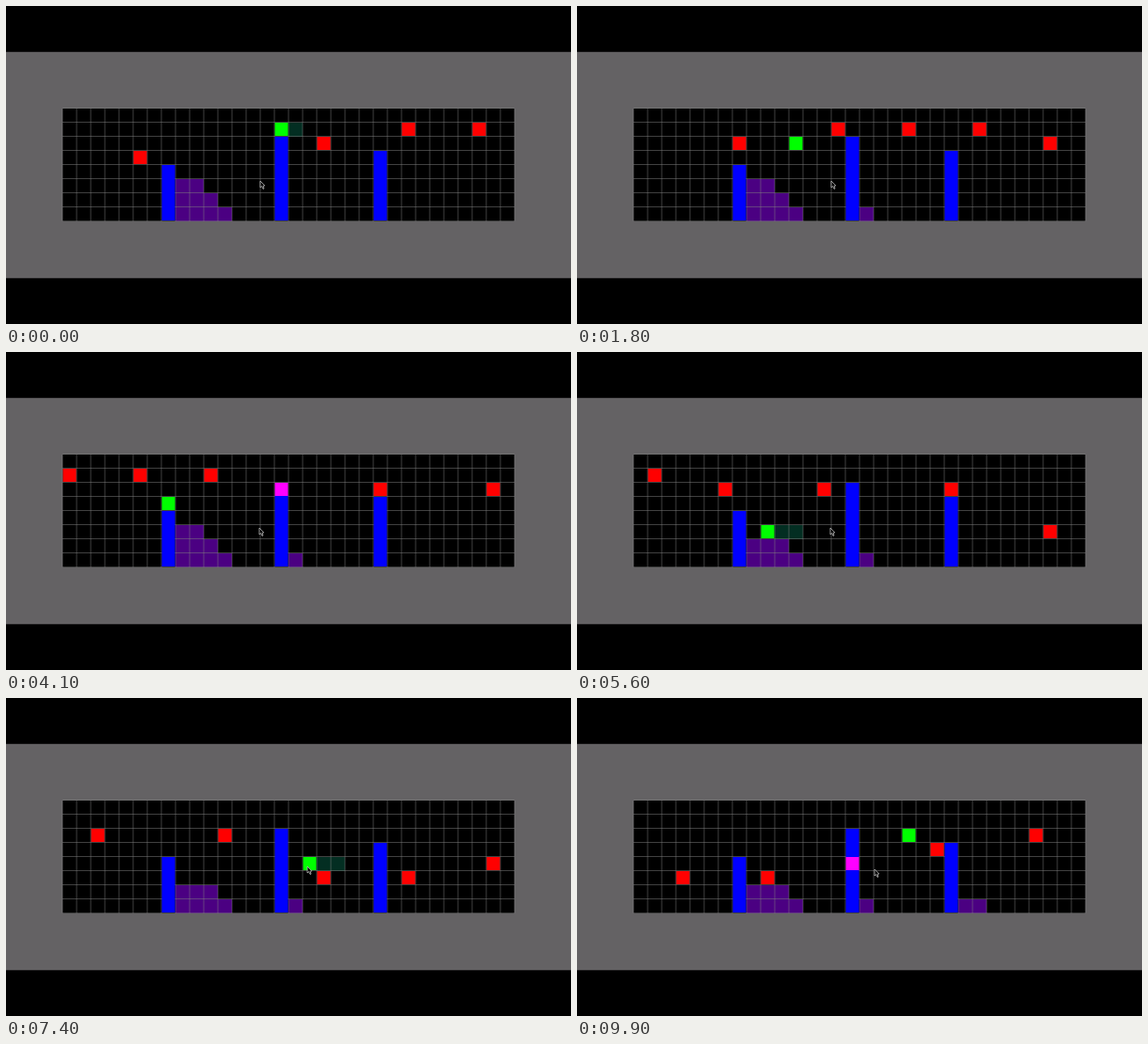
An HTML page with a canvas that plays this animation: 600 px wide and 338 px high, repeating every 10 s.

```html
<!DOCTYPE html>
<html lang="en">
<head>
<meta charset="utf-8">
<title>Grid runner</title>
<style>
html, body { margin: 0; width: 100%; height: 100%; overflow: hidden; background: #000; }
canvas { display: block; }
</style>
</head>
<body>
<canvas id="stage" width="600" height="338"></canvas>
<script>
const ctx = document.getElementById('stage').getContext('2d');
const LOOP = 10000, TICK = 100;
const CELL = 15, LEFT = 60, TOP = 109, COLS = 32, ROWS = 8;
const SPEED = 0.595; // columns per tick

const towers = [
  { col: 7, top: 4 },
  { col: 15, top: 2 },
  { col: 22, top: 3 }
];

// Evenly spaced groups that drift left, each with a rule for its rows.
const waves = [
  { start: 5.5, gap: 12.9, count: 2, row: i => 3 - i },
  { start: 24.75, gap: 5, count: 4, row: i => Math.max(1, i - 1) },
  { start: 46.65, gap: 8.7, count: 2, row: () => 2 },
  { start: 62.4, gap: 6.15, count: 5, row: i => Math.min(5, 6 - i) }
];

// Key points: [tick, column, row]
const playerPath = [
  [0, 15, 1], [18, 11, 2], [37, 7, 2], [46, 6.9, 3.4], [50, 8, 5], [56, 9, 5],
  [62, 14, 7], [69, 15, 2], [74, 17, 4], [79, 19, 7], [88, 21, 2], [91, 21, 2], [95, 19, 2]
];

// Key points: [tick, x, y]
const cursorPath = [[0, 270, 186], [64, 269, 187], [70, 321, 179], [100, 316, 182]];

function along(path, tick) {
  let i = 0;
  while (i < path.length - 2 && path[i + 1][0] <= tick) i++;
  const [t0, x0, y0] = path[i], [t1, x1, y1] = path[i + 1];
  const k = Math.min(1, (tick - t0) / (t1 - t0));
  return {
    x: Math.round(x0 + (x1 - x0) * k),
    y: Math.round(y0 + (y1 - y0) * k),
    forward: x1 >= x0
  };
}

function rect(color, x, y, w, h) {
  ctx.fillStyle = color;
  ctx.fillRect(x, y, w, h);
}

function cells(color, col, row, w = 1, h = 1) {
  rect(color, LEFT + col * CELL, TOP + row * CELL, w * CELL, h * CELL);
}

// A cell or column of cells that leaves the surrounding grid line visible.
function tile(color, col, row, h = 1) {
  rect(color, LEFT + col * CELL + 0.5, TOP + row * CELL, CELL - 1, h * CELL - 1);
}

// Steps falling to the right, capped at a height.
function heap(col, width, cap) {
  for (let i = 0; i < width; i++) {
    const height = Math.min(cap, width - i);
    cells('#4b0082', col + i, ROWS - height, 1, height);
  }
}

function drawLines() {
  const color = 'rgba(128,128,128,0.5)';
  for (let c = 0; c <= COLS; c++) rect(color, LEFT + c * CELL - 0.5, TOP, 1, ROWS * CELL);
  for (let r = 0; r <= ROWS; r++) rect(color, LEFT, TOP + r * CELL - 1, COLS * CELL, 1);
}

function drawEnemies(tick) {
  ctx.globalCompositeOperation = 'lighter'; // red over blue turns magenta
  for (const { start, gap, count, row } of waves) {
    for (let i = 0; i < count; i++) {
      const col = Math.floor(start + i * gap - SPEED * tick);
      if (col >= 0 && col < COLS) tile('#f00', col, row(i));
    }
  }
  ctx.globalCompositeOperation = 'source-over';
}

function drawCursor({ x, y }) {
  ctx.beginPath();
  [[0, 0], [0, 7], [1.7, 5.6], [3, 8.5], [4, 8], [3, 5.2], [4.8, 5]]
    .forEach(([dx, dy]) => ctx.lineTo(x + dx, y + dy));
  ctx.closePath();
  ctx.fillStyle = '#000';
  ctx.fill();
  ctx.strokeStyle = '#bbb';
  ctx.lineWidth = 0.8;
  ctx.stroke();
}

function draw(tick) {
  rect('#000', 0, 0, 600, 338);
  rect('#646264', 0, 48.8, 600, 240.5);
  rect('#000', LEFT, TOP, COLS * CELL, ROWS * CELL);

  const player = along(playerPath, tick);
  const beam = tick < 3 ? 1 : player.forward ? 2 : 0;
  cells('#032e22', player.x + 1, player.y, beam);

  heap(8, 4, tick < 49 ? 3 : 2);
  if (tick >= 6) heap(16, 1, 1);
  if (tick >= 91) heap(23, 2, 1);

  drawLines();
  for (const { col, top } of towers) tile('#00f', col, top, ROWS - top);
  drawEnemies(tick);
  tile('#0f0', player.x, player.y);
  drawCursor(along(cursorPath, tick));
}

function frame() {
  draw(Math.floor((performance.now() % LOOP) / TICK));
  requestAnimationFrame(frame);
}
frame();
</script>
</body>
</html>
```
